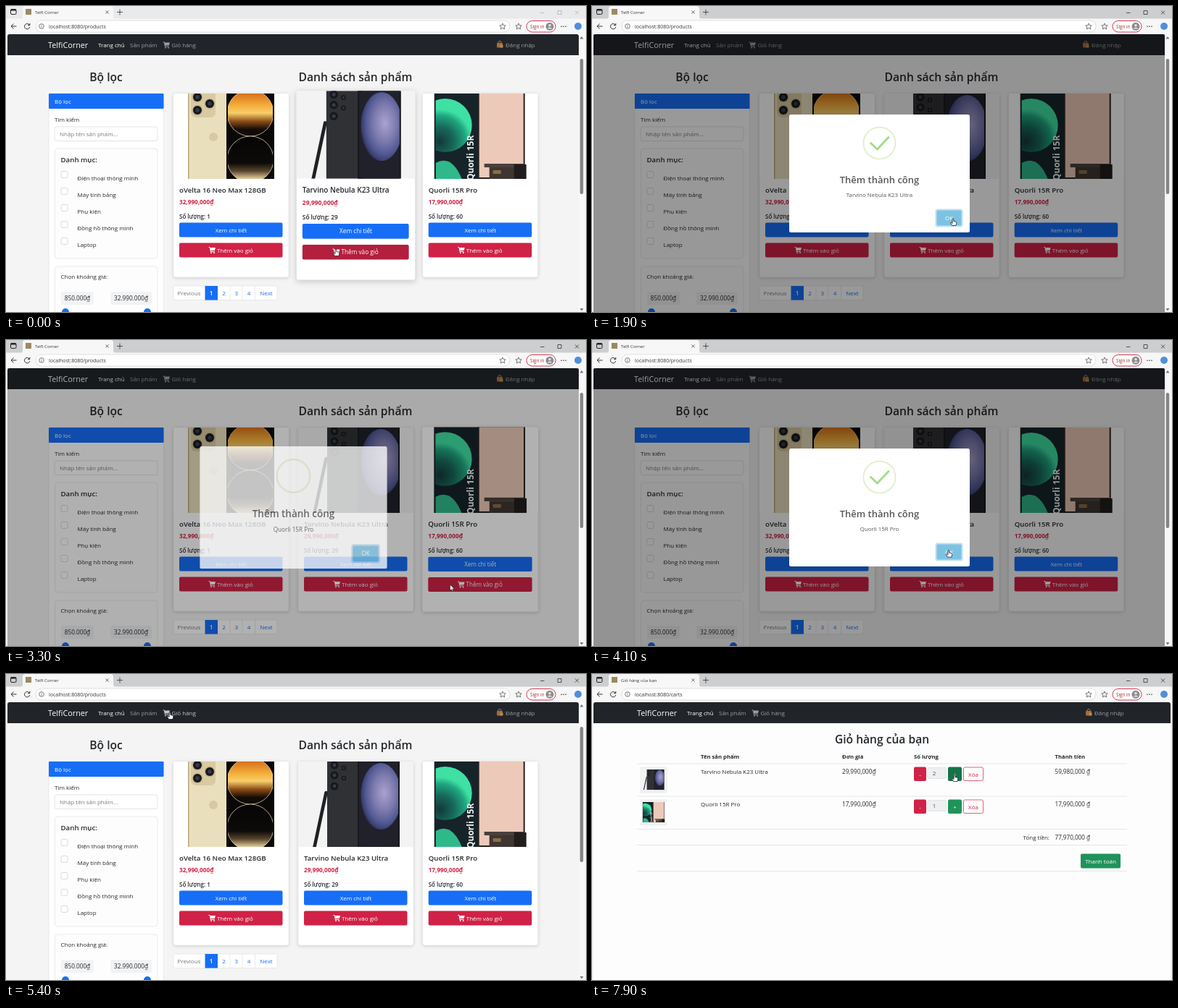
Write an HTML page that moves like this. It is 800 px wide and 423 px high and loops after 8 s.

```html
<!DOCTYPE html>
<html lang="vi">
<head>
<meta charset="utf-8">
<title>Telfi Corner</title>
<style>
  html, body { margin: 0; width: 100%; height: 100%; overflow: hidden; background: #f4f4f4; }
  svg { display: block; width: 100vw; height: 100vh; font-family: "Open Sans", "Noto Sans", sans-serif; }
</style>
</head>
<body>
<svg id="stage" viewBox="0 0 800 423" preserveAspectRatio="none"></svg>
<script>
const LOOP = 8000, STEP = 100;
const BLUE = '#176ef6', RED = '#d02246', DARK_RED = '#b31f3d', GREEN = '#20935a', INK = '#24282c', LINE = '#e0e1e3';

const rect = (x, y, w, h, fill, rx = 0, more = '') =>
  `<rect x="${x}" y="${y}" width="${w}" height="${h}" fill="${fill}" rx="${rx}" ${more}/>`;
const circle = (x, y, r, fill, more = '') => `<circle cx="${x}" cy="${y}" r="${r}" fill="${fill}" ${more}/>`;
const text = (x, y, s, size = 8, fill = INK, weight = 400, anchor = 'start', more = '') =>
  `<text x="${x}" y="${y}" font-size="${size}" fill="${fill}" font-weight="${weight}" text-anchor="${anchor}" ${more}>${s}</text>`;
const stroke = (d, color, width = 1, more = '') =>
  `<path d="${d}" fill="none" stroke="${color}" stroke-width="${width}" ${more}/>`;
const group = (x, y, body) => `<g transform="translate(${x} ${y})">${body}</g>`;
const border = (color = LINE, width = .7) => `stroke="${color}" stroke-width="${width}"`;
const stopList = stops => stops.map(([at, color]) => `<stop offset="${at}" stop-color="${color}"/>`).join('');
const gradient = (id, stops) => `<linearGradient id="${id}" x2="0" y2="1">${stopList(stops)}</linearGradient>`;
const glow = (id, x, y, stops) => `<radialGradient id="${id}" cx="${x}" cy="${y}" r=".6">${stopList(stops)}</radialGradient>`;
const clip = (id, body) => `<clipPath id="${id}">${body}</clipPath>`;

const products = [
  { name: 'oVelta 16 Neo Max 128GB', price: '32,990,000₫', stock: 1, x: 231 },
  { name: 'Tarvino Nebula K23 Ultra', price: '29,990,000₫', stock: 29, x: 403 },
  { name: 'Quorli 15R Pro', price: '17,990,000₫', stock: 60, x: 574.7 }
];

const lens = (x, y, r) => circle(x, y, r, '#17181b') + circle(x, y, r * .45, '#343b4c');

const goldPhone = rect(0, 0, 159, 118, '#fff') +
  rect(20, -12, 66, 140, '#eadfbd') + rect(20, -12, 1.5, 140, '#b9a777') +
  rect(24, -8, 34, 41, '#d9caa2', 7) +
  [[33, 5], [50, 14], [33, 23]].map(([x, y]) => circle(x, y, 7.5, '#c4b58c') + lens(x, y, 6)).join('') +
  circle(55, 60, 6, '#d8c9a2') +
  rect(73, -10, 66, 140, '#0a0806') +
  `<g clip-path="url(#goldScreen)">${circle(106, 27, 32, 'url(#sunset)', border('#f7e6bd'))}
   ${circle(106, 91, 32, 'url(#dune)', border('#f7e6bd'))}</g>`;

const darkPhone = rect(0, 0, 159, 118, '#f3f3f3') +
  rect(40, -8, 48, 140, '#303134', 4) +
  [5, 19, 34].map(y => lens(50, y, 5.5)).join('') + lens(63, 9, 3.3) + lens(63, 23, 3.3) +
  rect(82, -2, 58, 140, '#17181c', 2) + rect(84, -2, 54, 140, '#20212b') +
  `<g clip-path="url(#darkScreen)"><ellipse cx="114" cy="48" rx="28" ry="46" fill="url(#orb)"/></g>` +
  stroke('M38.5 43L22.5 118', '#202124', 4.6, 'stroke-linecap="round"');

const greenPhone = rect(0, 0, 159, 118, '#fff') +
  rect(16, -4, 62, 130, '#16242a', 4) +
  `<g clip-path="url(#greenScreen)">${circle(31, 44, 37, 'url(#leaf)')}
   <path d="M18 96Q40 84 54 118H18Z" fill="#2fb98a"/></g>` +
  text(0, 0, 'Quorli 15R', 12, '#f5f7f7', 700, 'start', 'transform="translate(70 120) rotate(-90)"') +
  rect(76, -4, 65, 130, '#26211f', 2) + rect(78, -2, 61, 118, '#edc9b9') +
  rect(85, 97, 54, 5, '#4a403b') + rect(92, 102, 36, 16, '#3f3632') + rect(97, 106, 11, 5, '#8a6f42') +
  rect(126, 98, 17, 20, '#211d1c');

const art = [goldPhone, darkPhone, greenPhone];
const defs = '<defs>' +
  gradient('sunset', [[0, '#b4551a'], [.1, '#d9771f'], [.32, '#f3ab38'], [.5, '#f8cf6a'], [.68, '#8a4c17'], [.85, '#150c07'], [1, '#0b0705']]) +
  gradient('dune', [[0, '#060505'], [.58, '#0d0a09'], [.75, '#57452d'], [.92, '#e2cc9c']]) +
  glow('orb', .58, .45, [[0, '#a9a3cf'], [.45, '#7d7aae'], [.75, '#535a94'], [.92, '#3a3f70'], [1, '#20212b']]) +
  glow('leaf', .4, .8, [[0, '#14383a'], [.45, '#17695a'], [.8, '#1fa57f'], [1, '#3fe0a4']]) +
  clip('photo', '<path d="M0 118V2Q0 0 2 0H157Q159 0 159 2V118Z"/>') +
  clip('goldScreen', rect(75, 0, 62, 118, '#000')) +
  clip('darkScreen', rect(84, 0, 54, 118, '#000')) +
  clip('greenScreen', rect(18, 0, 58, 118, '#000')) +
  art.map((body, i) => `<g id="art${i}" clip-path="url(#photo)">${body}</g>`).join('') + '</defs>';

// Takes its colour from the surrounding group.
const trolley = (x, y) => group(x, y, '<path d="M0 0H1.8L2.2 1H9.5L8.4 5H3.1L3.3 6H8.3V7H2.5L1.3 1H0Z"/>' +
  '<circle cx="3.5" cy="8.2" r=".9"/><circle cx="7.6" cy="8.2" r=".9"/>');

const star = x => stroke(`M${x} 24l1.2 2.7 3 .3-2.2 2 .7 3-2.7-1.5-2.7 1.5 .7-3-2.2-2 3-.3Z`, '#555', .8);
const browser = rect(0, 0, 800, 39, '#cdcecf', 0, 'id="tabBar"') +
  rect(6.5, 4.5, 7.5, 7, 'none', 1.5, border('#222', 1)) + rect(6.5, 4.5, 7.5, 2, '#222') +
  '<path d="M20 18Q23 18 23 14V4Q23 0 27 0H144Q148 0 148 4V14Q148 18 152 18Z" fill="#f7f7f7"/>' +
  rect(0, 17.5, 800, 21.5, '#f7f7f7') + rect(27, 4, 8, 8, '#9b8a62') +
  text(40, 10.8, '', 6.1, '#333', 400, 'start', 'id="tab"') +
  stroke('M137.5 6.5l4 4m0-4l-4 4M153 8.5h8M157 4.5v8', '#333', .8) +
  stroke('M737 9.5h5.5M785 6.5l5 5m0-5l-5 5M761 6.5h5v5h-5Z', '#333', .8, 'id="windowButtons"') +
  stroke('M14.5 28H7M10.5 24.5L7 28L10.5 31.5', '#333') +
  stroke('M32.3 26.2A3.7 3.7 0 1 0 32.8 29M32.8 24V26.7H30', '#333') +
  rect(41, 20, 654, 16, '#fff', 8, border('#d5d5d5')) +
  circle(49, 28, 3.3, 'none', border('#555', .8)) + stroke('M49 27.5v2.3M49 26v.8', '#555', .8) +
  text(59, 30.7, '', 7, '#333', 400, 'start', 'id="url"') + star(685) + star(707) +
  rect(718, 20.5, 40, 15.5, '#fff', 7.7, border('#cf3650', 1)) + text(723, 30.6, 'Sign in', 6.3, '#a4262c') +
  circle(750, 28.3, 5.5, '#8b8b8e') + circle(750, 26.7, 1.8, '#e4e4e6') + '<path d="M746.5 31.5Q750 27.5 753.5 31.5Z" fill="#e4e4e6"/>' +
  [766, 769, 772].map(x => circle(x, 28.3, .8, '#333')).join('') + circle(789, 28, 5, '#4f8fdb');

const nav = (dx, right) =>
  `<path d="M2 68V42Q2 39 5 39H${right - 3}Q${right} 39 ${right} 42V68Z" fill="#212529"/>` + group(dx, 0,
    text(58, 57.5, 'TelfiCorner', 10.8, '#fff') + text(127, 57, 'Trang chủ', 8, '#fff') +
    text(171, 57, 'Sản phẩm', 8, '#9b9da0') +
    `<g class="cartLink">${trolley(216.5, 49.5)}${text(228.5, 57, 'Giỏ hàng', 8, 'inherit')}</g>` +
    rect(677, 51, 8, 6.5, '#a86a3c', 1) + stroke('M679 51V49.5Q681 47 683 49.5V51', '#8b8178') + rect(681.5, 53.5, 4, 4, '#b98d3c', .5) +
    text(689, 57, 'Đăng nhập', 8, '#9b9da0'));

const categories = ['Điện thoại thông minh', 'Máy tính bảng', 'Phụ kiện', 'Đồng hồ thông minh', 'Laptop'];
const sidebar = rect(59, 121, 158.5, 310, '#fff', 2, border()) + rect(59, 121, 158.5, 21, BLUE, 1) +
  text(67, 134.5, 'Bộ lọc', 8, '#fff') + text(67, 160, 'Tìm kiếm') +
  rect(67, 167, 142, 19.5, '#fff', 3, border('#d7d9dc')) + text(74, 180, 'Nhập tên sản phẩm...', 8, '#777b80') +
  rect(67.5, 197, 141.5, 152, '#fdfdfd', 4, border()) + text(75.5, 215.5, 'Danh mục:', 9.7, INK, 600) +
  categories.map((name, i) => rect(76, 228.5 + i * 23, 9, 9, '#fff', 2, border('#c9ccd0')) + text(98.5, 241 + i * 23, name)).join('') +
  rect(67.5, 360, 141.5, 80, '#fdfdfd', 4, border()) + text(75.5, 377, 'Chọn khoảng giá:') +
  rect(76, 395, 45, 18, '#f2f3f4', 2) + rect(144, 395, 57, 18, '#f2f3f4', 2) +
  text(98.5, 407, '850.000₫', 8.2, INK, 500, 'middle') + text(172.5, 407, '32.990.000₫', 8.2, INK, 500, 'middle') +
  circle(82, 423, 5, BLUE) + circle(195, 423, 5, BLUE);

const card = ({ name, price, stock, x }, i) => '<g class="card">' + group(x, 121,
  rect(0, 0, 159, 254, '#fff', 3, border('#e4e4e4', .6)) + `<use href="#art${i}"/>` +
  text(8, 137, name, 9.7, INK, 600) + text(8, 153, price, 8.2, RED, 700) +
  text(8, 173, 'Số lượng: ' + stock, 8, INK, 600) +
  rect(8, 178.5, 142.5, 20, BLUE, 2) + text(79.5, 191.5, 'Xem chi tiết', 8, '#fff', 400, 'middle') +
  rect(8, 206.5, 142.5, 20, RED, 2, 'class="add"') + `<g fill="#fff">${trolley(48.5, 212)}</g>` +
  text(60, 219.5, 'Thêm vào giỏ', 8, '#fff')) + '</g>';

const pager = rect(231, 387, 143, 19.5, '#fff', 2, border()) + rect(274.5, 387, 17.5, 19.5, BLUE) +
  [309, 326, 343.5].map(x => stroke(`M${x} 387v19.5`, LINE, .7)).join('') +
  text(252.5, 400, 'Previous', 8, '#70757a', 400, 'middle') + text(283, 400, '1', 8, '#fff', 600, 'middle') +
  [2, 3, 4].map((n, i) => text(300.5 + i * 17.3, 400, n, 8, BLUE, 400, 'middle')).join('') + text(359, 400, 'Next', 8, BLUE, 400, 'middle');

const shop = '<g id="shop">' + rect(0, 39, 800, 384, '#f4f4f4') + nav(0, 790) +
  text(138, 104, 'Bộ lọc', 15.6, INK, 600, 'middle') + text(482, 104, 'Danh sách sản phẩm', 15.6, INK, 600, 'middle') +
  sidebar + pager + products.map(card).join('') +
  rect(790, 39, 8, 384, '#f7f7f7') + rect(791.7, 73, 4.5, 187, '#858585', 2.2) +
  '<path d="M791.5 45.5L794 42L796.5 45.5ZM791.5 418L794 421.5L796.5 418Z" fill="#777"/></g>';

const cartRow = (i, y) => group(0, y,
  rect(67, 5, 36, 35, '#f1f1f1', 1, border('#e7e7e7', .6)) +
  `<use href="#art${i}" transform="translate(66 8) scale(.24)"/>` +
  text(150, 14, products[i].name) + text(345, 14, products[i].price, 8.2) +
  rect(444, 4.5, 17, 19.5, RED, 2) + text(452.5, 17.5, '-', 8, '#fff', 400, 'middle') +
  rect(462.5, 5.5, 26, 15, '#eeeff1', 2, border('#d9dbde')) + text(472, 16, '1', 8, '#555', 400, 'middle', `id="qty${i}"`) +
  rect(491, 4.5, 19, 19.5, GREEN, 2, `id="plus${i}"`) + text(500.5, 17.5, '+', 8, '#fff', 400, 'middle') +
  rect(512.5, 5, 27, 18.5, '#fff', 2, border(RED)) + text(526, 17.5, 'Xóa', 8, RED, 400, 'middle') +
  text(638.5, 14, products[i].price.replace('₫', ' ₫'), 8.2, INK, 400, 'start', `id="sum${i}"`));

const cart = '<g id="cart">' + rect(0, 39, 800, 384, '#f4f4f4') + rect(2, 39, 796, 390, '#fdfdfd', 3) + nav(4, 798) +
  text(400, 95.5, 'Giỏ hàng của bạn', 15.6, INK, 600, 'middle') +
  [[150, 'Tên sản phẩm'], [345, 'Đơn giá'], [444, 'Số lượng'], [638.5, 'Thành tiền']].map(([x, s]) => text(x, 117, s, 7.7, INK, 700)).join('') +
  [124, 169, 214.5, 236.5, 272.5].map(y => stroke(`M62 ${y}H738`, LINE, .8)).join('') +
  cartRow(1, 124) + cartRow(2, 169) +
  text(631, 228.5, 'Tổng tiền:', 8, INK, 400, 'end') + text(638.5, 228.5, '', 8.2, INK, 400, 'start', 'id="total"') +
  rect(674, 248.5, 55, 20, GREEN, 2) + text(701.5, 261.5, 'Thanh toán', 8, '#fff', 400, 'middle') + '</g>';

const popup = rect(2, 39, 788, 384, '#000', 0, 'id="shade"') + '<g id="popup">' +
  rect(-124.5, -81.5, 249, 163, '#fff', 2.5) + circle(0, -42, 22, 'none', border('#e3efcf', 2)) +
  stroke('M-12 -42L-3 -33.5L12.5 -50', '#a0dc84', 2.7, 'id="tick" pathLength="1" stroke-dasharray="1 2" stroke-linecap="round"') +
  text(0, 13, 'Thêm thành công', 13, '#555', 600, 'middle') + text(0, 32.5, '', 7.9, '#555', 400, 'middle', 'id="added"') +
  rect(77, 49, 38, 25, '#c2dff1', 3) + rect(79, 51, 34, 21, '#7cc3e3', 2) + text(96, 64.5, 'OK', 8, '#fff', 400, 'middle') + '</g>';

const pointers =
  '<path id="arrow" d="M0 0V8.5L2 6.7L3.3 9.5L4.6 8.9L3.3 6.2H6Z" fill="#fff" stroke="#222" stroke-width=".7"/>' +
  '<path id="hand" d="M-.9 .5Q0 -.5 .9 .5V3.5L4 4.2Q5 4.5 4.8 6L4 9.5H-1.5L-3.5 6Q-3.3 4.8-2 5.5L-.9 6.5Z" fill="#fff" stroke="#222" stroke-width=".8"/>';

document.getElementById('stage').innerHTML = defs + shop + cart + popup + browser + pointers;

const $ = id => document.getElementById(id);
const show = (id, on) => { $(id).style.display = on ? '' : 'none'; };
const cards = [...document.querySelectorAll('.card')];
const addButtons = [...document.querySelectorAll('.add')];
const cartLinks = [...document.querySelectorAll('.cartLink')];
const clamp = v => Math.max(0, Math.min(1, v));
const within = (t, spans) => spans.some(([a, b]) => t >= a && t < b);

// Pointer stops: time, x, y.
const path = [[0, 455, 336], [700, 455, 336], [1300, 498, 294], [2050, 498, 294], [2600, 611, 337], [3350, 612.5, 338],
  [4000, 492, 291], [4460, 491, 288], [4600, 488, 266], [5400, 226, 53], [6500, 226, 53], [7050, 500, 139], [LOOP, 500, 139]];
const handSpans = [[0, 520], [1200, 2010], [2500, 3170], [3950, 4470], [5300, 6540], [6980, LOOP]];
const hovers = [[[4930, 5090]], [[-900, 500], [2080, 2350], [4600, 4904]], [[2386, 3140]]];
const addHovers = [[], [[0, 500]], [[2520, 3140]]];
const popups = [[500, 2000], [3170, 4460]];
const FOCUS = 400, CART_OPEN = 5900, PLUS_HOVER = 6980, PLUS_CLICK = 7400;

function pointerAt(t) {
  const i = path.findIndex(([at]) => at > t), [t0, x0, y0] = path[i - 1], [t1, x1, y1] = path[i];
  const u = (t - t0) / (t1 - t0), e = u * u * (3 - 2 * u);
  return [x0 + (x1 - x0) * e, y0 + (y1 - y0) * e];
}

const hoverAt = (t, spans) => Math.max(0, ...spans.map(([a, b]) => Math.min(clamp((t - a) / 200), 1 - clamp((t - b) / 200))));

function popScale(u) {
  if (u < .45) return .7 + .35 * u / .45;
  if (u < .8) return 1.05 - .1 * (u - .45) / .35;
  return .95 + .05 * clamp((u - .8) / .2);
}

function drawPopup(t) {
  const i = popups.findIndex(([a, b]) => t >= a && t < b + 150);
  show('popup', i >= 0);
  show('shade', i >= 0);
  if (i < 0) return;
  const [a, b] = popups[i], leaving = clamp((t - b) / 150), shown = clamp((t - a) / 170);
  const scale = popScale((t - a) / 300) * (1 - .5 * leaving);
  $('shade').setAttribute('opacity', .4 * shown * (1 - leaving));
  $('popup').setAttribute('opacity', shown * clamp(1 - 1.1 * leaving));
  $('popup').setAttribute('transform', `translate(396.5 231.5) scale(${scale})`);
  const drawn = clamp((t - a - 250) / 350);
  $('tick').setAttribute('stroke-dashoffset', 1 - drawn);
  $('tick').style.visibility = drawn ? 'visible' : 'hidden';
  $('added').textContent = products[i + 1].name;
}

function draw(t) {
  const inCart = t >= CART_OPEN, bought = t >= PLUS_CLICK, focused = t >= FOCUS;
  show('shop', !inCart);
  show('cart', inCart);
  $('tabBar').setAttribute('fill', focused ? '#cdcecf' : '#e9eaeb');
  $('windowButtons').setAttribute('stroke', focused ? '#333' : '#b0b0b0');
  $('tab').textContent = inCart ? 'Giỏ hàng của bạn' : 'Telfi Corner';
  $('url').textContent = 'localhost:8080/' + (inCart ? 'carts' : 'products');
  cards.forEach((el, i) => {
    const h = hoverAt(t, hovers[i]), cx = products[i].x + 79.5;
    el.setAttribute('transform', `translate(${cx} 248) scale(${1 + .03 * h}) translate(${-cx} -248)`);
    el.style.filter = `drop-shadow(0 ${1 + h}px ${2 + 2 * h}px rgba(0,0,0,${.15 + .04 * h}))`;
    addButtons[i].setAttribute('fill', within(t, addHovers[i]) ? DARK_RED : RED);
  });
  cartLinks.forEach(el => el.setAttribute('fill', within(t, [[5300, 6540]]) ? '#c4c5c7' : '#9b9da0'));
  $('plus1').setAttribute('fill', t >= PLUS_HOVER ? '#15734a' : GREEN);
  $('qty1').textContent = bought ? 2 : 1;
  $('sum1').textContent = bought ? '59,980,000 ₫' : '29,990,000 ₫';
  $('total').textContent = bought ? '77,970,000 ₫' : '47,980,000 ₫';
  drawPopup(t);
  const [x, y] = pointerAt(t), hand = within(t, handSpans);
  show('hand', hand);
  show('arrow', !hand);
  $(hand ? 'hand' : 'arrow').setAttribute('transform', `translate(${x} ${y})`);
}

const start = performance.now();
function tick() {
  const t = (performance.now() - start) % LOOP;
  draw(Math.floor(t / STEP) * STEP);
  requestAnimationFrame(tick);
}
tick();
</script>
</body>
</html>
```
